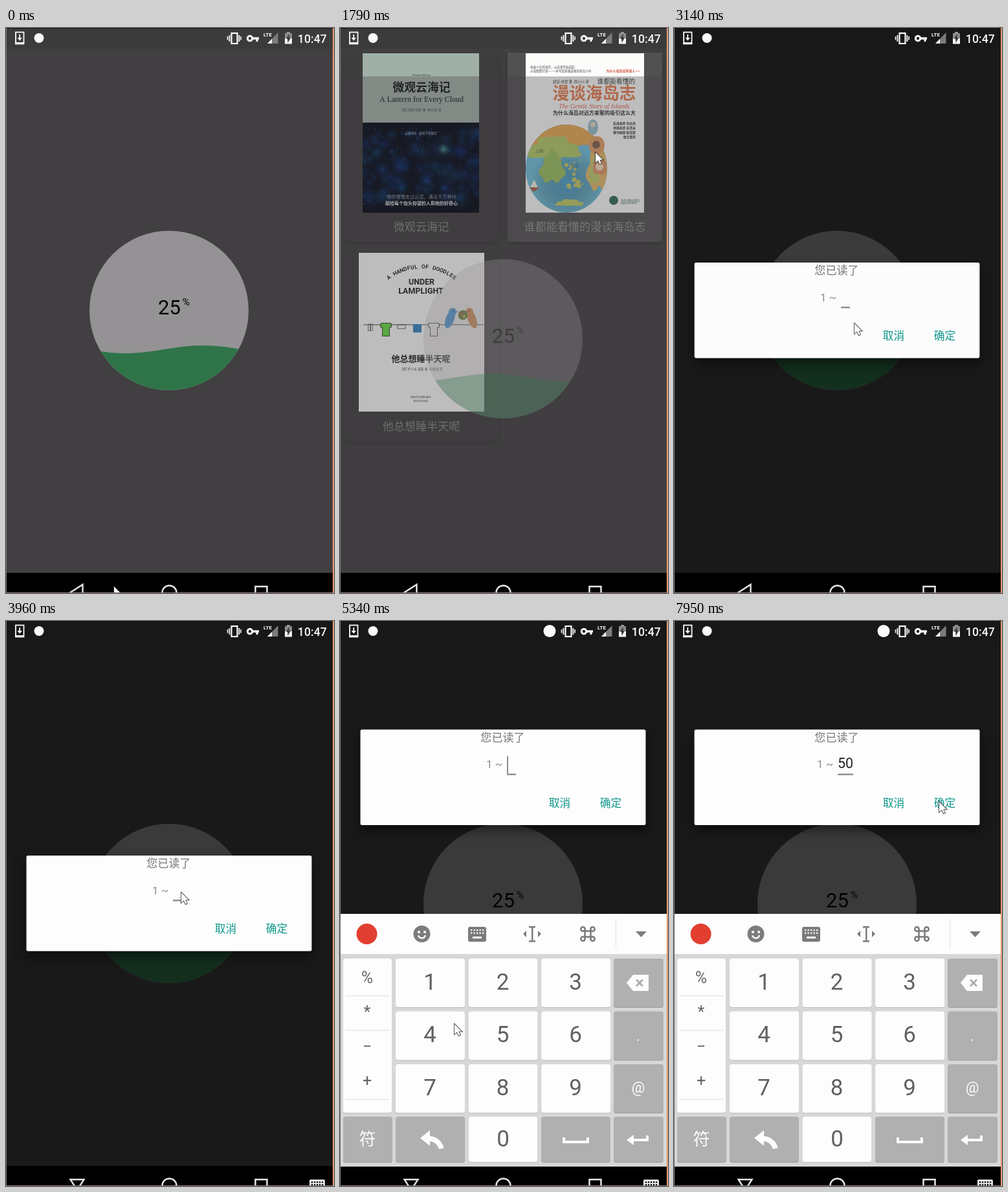
An HTML page with a canvas that plays this animation: 507 px wide and 872 px high, repeating every 8 s.

```html
<!DOCTYPE html>
<html lang="zh">
<head>
<meta charset="utf-8">
<title>Reading progress</title>
<style>
  html, body { margin: 0; width: 100%; height: 100%; overflow: hidden; background: #413f41; }
  canvas { display: block; }
</style>
</head>
<body>
<canvas id="stage" width="507" height="872"></canvas>
<script>
const W = 507, H = 872, LOOP = 8000, TAU = 2 * Math.PI;
const SANS = 'Roboto, "Noto Sans CJK SC", "Noto Sans CJK", sans-serif';
const SERIF = '"Liberation Serif", "Noto Sans CJK SC", "Noto Sans CJK", serif';
const ARIAL = '"Liberation Sans", "Noto Sans CJK SC", sans-serif';
const BG = '#413f41', GREY = '#7c7c7e', WHITE = '#fdfdfd', INK = '#222', KEYTEXT = '#606062';

// Moments when something is pressed or appears
const BACK = 400, OPEN_BOOK = 1590, ASK = 2940, FOCUS = 3960, SLIDE = 4000, BADGE = 4250;
const NUMERIC = 5080, FIVE = 6130, ZERO = 7200;

const main = document.getElementById('stage').getContext('2d');
let g = main;

const clamp = v => Math.max(0, Math.min(1, v));
const span = (t, a, b) => clamp((t - a) / (b - a));
const easeOut = p => 1 - (1 - p) ** 3;
const mix = (a, b, p) => a + (b - a) * p;
const times = (n, fn) => { for (let i = 0; i < n; i++) fn(i); };
const seeded = seed => () => (seed = (seed * 16807) % 2147483647) / 2147483647;

// y is the middle of the capital height
function text(s, x, y, size, color, { align = 'center', weight = 400, font = SANS, style = '' } = {}) {
  g.font = `${style} ${weight} ${size}px ${font}`;
  g.textAlign = align;
  g.fillStyle = color;
  g.fillText(s, x, y + size * 0.36);
}
function rect(x, y, w, h, color) { g.fillStyle = color; g.fillRect(x, y, w, h); }
function frameRect(x, y, w, h, color, width) {
  g.strokeStyle = color; g.lineWidth = width; g.strokeRect(x, y, w, h);
}
function round(x, y, w, h, r, color) {
  g.beginPath(); g.roundRect(x, y, w, h, r);
  g.fillStyle = color; g.fill();
}
function oval(x, y, rx, ry, color, turn = 0) {
  g.beginPath(); g.ellipse(x, y, rx, ry, turn, 0, TAU);
  g.fillStyle = color; g.fill();
}
const disc = (x, y, r, color) => oval(x, y, r, r, color);
function arc(x, y, r, color, width, from = 0, to = TAU) {
  g.beginPath(); g.arc(x, y, r, from, to);
  g.strokeStyle = color; g.lineWidth = width; g.stroke();
}
function line(points, color, width = 1, closed = false) {
  g.beginPath();
  points.forEach(p => g.lineTo(...p));
  if (closed) g.closePath();
  g.strokeStyle = color; g.lineWidth = width; g.stroke();
}
// Triangle from its tip to a base (dx, dy) away
function tri(x, y, dx, dy, half, color, outline) {
  const k = half / Math.hypot(dx, dy);
  g.beginPath();
  g.moveTo(x, y);
  g.lineTo(x + dx - dy * k, y + dy + dx * k);
  g.lineTo(x + dx + dy * k, y + dy - dx * k);
  g.closePath();
  if (outline) { g.strokeStyle = color; g.lineWidth = outline; g.stroke(); }
  else { g.fillStyle = color; g.fill(); }
}
function tray(x, y, w, h, color) {
  line([[x, y], [x, y + h], [x + w, y + h], [x + w, y]], color, 4);
}
function keyDots(x, y, step, color) {
  times(10, i => rect(x + i % 5 * step, y + (i / 5 | 0) * step, 2.2, 2.2, color));
}
function land(x, y, rx, ry, color, seed) {
  const rnd = seeded(seed), a = rnd() * TAU, b = rnd() * TAU;
  g.beginPath();
  for (let u = 0; u < TAU; u += 0.1) {
    const r = 1 + 0.16 * Math.sin(3 * u + a) + 0.1 * Math.sin(7 * u + b);
    g.lineTo(x + rx * r * Math.cos(u), y + ry * r * Math.sin(u));
  }
  g.fillStyle = color; g.fill();
}
function glow(x, y, r, color) {
  const f = g.createRadialGradient(x, y, 0, x, y, r);
  f.addColorStop(0, color); f.addColorStop(1, 'transparent');
  rect(x - r, y - r, 2 * r, 2 * r, f);
}
function within(path, draw) {
  g.save(); g.beginPath(); path(); g.clip();
  draw(); g.restore();
}

// ---- book list ----
function card(x, y, title) {
  g.save();
  g.shadowColor = 'rgba(0,0,0,.2)'; g.shadowBlur = 9; g.shadowOffsetY = 3;
  round(x, y, 239, 292, 10, '#3e3d3e');
  g.restore();
  text(title, x + 119.5, y + 269, 17.1, '#858787');
}
function cloudBook() {
  rect(35, 39, 180, 108, '#a0b0a7');
  text('Wenlan Harrow', 126, 72, 4.5, '#333', { font: SERIF });
  text('微观云海记', 126, 92, 17.8, '#161616', { font: SERIF, weight: 600 });
  text('A Lantern for Every Cloud', 126, 110, 12, '#161616', { font: SERIF });
  text('(英) 闻岚·哈罗 著  林小禾 译', 126, 126, 5, '#444');
  const rnd = seeded(41);
  within(() => g.rect(35, 146, 180, 139), () => {
    rect(35, 146, 180, 139, '#030814');
    times(90, () => glow(35 + rnd() * 180, 160 + rnd() * 105, 6 + rnd() * 18, `rgba(10,${45 + rnd() * 50 | 0},165,.34)`));
    times(260, () => rect(35 + rnd() * 180, 152 + rnd() * 125, 1.4, 1.4, `rgba(50,110,225,${rnd() * .7})`));
    glow(160, 187, 13, 'rgba(90,190,190,.75)');
  });
  text('云端书房 · 给孩子的夜空', 125, 162, 4.6, '#c8ced8');
  text('带你慢慢走过云层，遇见千万种光', 126, 260, 7.2, '#8f98a8');
  text('献给每个抬头仰望的人和他的好奇心', 126, 270, 7, '#e8e8e8', { weight: 700 });
}
function islandBook() {
  const left = { align: 'left' }, bold = { weight: 700 };
  rect(287, 39, 183, 246, '#fbfcfa');
  text('每座小岛的来历，从这里开始说起', 294, 60, 4.6, '#333', left);
  text('从海图到灯塔——一本写给普通读者的海岛小书', 294, 66, 4.6, '#333', left);
  text('为什么海岛这样迷人——', 464, 66, 5, '#d0392b', { align: 'right', weight: 700 });
  text('顾安·林登 著  周小川 译', 357, 83, 5.4, INK);
  text('谁都能看懂的', 427, 82, 9.8, INK, { weight: 500 });
  text('漫谈海岛志', 393, 101, 25.8, '#e0703f', { weight: 900 });
  text('The Gentle Story of Islands', 393, 120, 10, '#dc5034', { font: SERIF, style: 'italic' });
  text('为什么海岛对远方来客的吸引这么大', 393, 131, 8, '#181818', bold);
  ['航海老师 何远舟', '地理老师 苏青禾', '图书编辑 陆知夏', '联合推荐'].forEach((s, i) =>
    text(s, 457, 147 + i * 7, 4.8, INK, { align: 'right', weight: 700 }));
  within(() => g.ellipse(350, 217, 63, 68, 0, 0, TAU), () => {
    rect(287, 149, 126, 136, '#5fb9d8');
    glow(350, 240, 55, 'rgba(25,130,185,.6)');
    land(345, 165, 62, 20, '#e3a040', 5);
    land(330, 186, 40, 17, '#a9c455', 12);
    land(328, 216, 18, 24, '#8db64f', 30);
    land(400, 215, 17, 38, '#e0b055', 8);
    land(393, 222, 7, 20, '#b5c75c', 21);
    land(355, 270, 21, 5, '#b8c552', 3);
    const rnd = seeded(9);
    times(16, () => disc(350 + rnd() * 28, 202 + rnd() * 52, 1 + rnd() * 2.5, '#bfc353'));
    text('山谷', 309, 190, 6, '#49442b');
    text('海湾', 362, 213, 6, '#2a5f78');
    tri(300, 234, 0, 12, 6, '#f5efe0');
    tri(300, 253, 0, -7, 8, '#9b4f2e');
  });
  oval(391, 153, 8, 12, '#8fb8c6'); disc(391, 149, 4, '#e6d4b8');
  oval(397, 181, 12, 14, '#dc9150'); disc(396, 180, 6, '#714c39');
  round(391, 204, 21, 22, 6, '#d98b55'); disc(401, 214, 6, '#f2d9b0');
  disc(423, 266, 7, '#1c5c45');
  text('南屿读物出版社', 434, 266, 4.2, '#1c5c45', left);
  text('NANYU BOOKS', 434, 271, 3.7, '#1c5c45', left);
}
function shirt(x, color) {
  round(x - 9, 455, 18, 8, 3, '#444'); rect(x - 6, 457, 12, 19, '#444');
  round(x - 8, 456, 16, 6, 3, color); rect(x - 5, 458, 10, 17, color);
}
function bird(x, color, dir) {
  oval(x, 449, 6.5, 15, color, dir * .35);
  disc(x + 4 * dir, 438, 6, color);
  tri(x + 13 * dir, 438, -5 * dir, 0, 2, color);
  disc(x + 5 * dir, 437, .9, INK);
}
function comicBook() {
  rect(29, 347, 194, 245, '#fbfcfa');
  const title = 'A HANDFUL OF DOODLES', bold = { weight: 700 };
  [...title].forEach((c, i) => {
    g.save();
    g.translate(126, 453);
    g.rotate(mix(-.64, .64, i / (title.length - 1)));
    text(c, 0, -85, 8.5, INK, bold);
    g.restore();
  });
  text('UNDER', 126, 391, 12.5, INK, bold);
  text('LAMPLIGHT', 125, 405, 12.5, INK, bold);
  rect(36, 457.5, 186, 1, '#444');
  times(2, i => frameRect(43.5 + i * 4, 457, 3, 10, '#555', .8));
  frameRect(89, 458, 12, 6, '#555', .9);
  round(113, 457, 13, 13, 1, '#3584c2');
  shirt(71, '#62dc3e');
  shirt(145, '#fff');
  bird(170, '#3594dc', 1);
  bird(204, '#d98746', -1);
  disc(190, 443, 7.5, '#5b7b2c'); disc(188, 441, 2, '#d43b2f'); disc(192, 445, 2, '#e2c54c');
  text('他总想睡半天呢', 125, 510, 13, INK, bold);
  text('[美] 罗小米·温斯 著  何清溪 译', 127, 526, 4.8, '#555');
  text('南屿美术读物出版社', 125, 570, 3.5, '#333');
  text('青禾文化出品', 125, 576, 3.8, '#333');
}

const list = document.createElement('canvas');
list.width = W; list.height = H;
function paintList() {
  g = list.getContext('2d');
  rect(0, 0, W, H, BG);
  card(6, 38, '微观云海记');
  card(259, 38, '谁都能看懂的漫谈海岛志');
  card(6, 346, '他总想睡半天呢');
  cloudBook(); islandBook(); comicBook();
  g = main;
}

// ---- progress page ----
function progressPage(trough) {
  rect(0, 31, W, H, BG);
  disc(252, 436, 123, '#949294');
  within(() => g.arc(252, 436, 123, 0, TAU), () => {
    g.beginPath(); g.moveTo(120, 570);
    for (let x = 120; x <= 384; x += 3) g.lineTo(x, 496 + 6 * Math.cos((x - trough) / 238 * TAU));
    g.lineTo(384, 570);
    g.fillStyle = '#2f7449'; g.fill();
  });
  text('25', 252.5, 431, 31, '#000');
  text('%', 278.5, 422, 15.5, '#000');
}
function pages(t) {
  g.drawImage(list, 0, 0);
  const first = t < OPEN_BOOK;
  const shown = first ? 1 - span(t, BACK + 120, BACK + 390) : easeOut(span(t, OPEN_BOOK + 160, OPEN_BOOK + 490));
  if (!first && shown < 1) within(() => g.rect(259, 38, 239, 292), () =>
    disc(395, 192, 260 * easeOut(span(t, OPEN_BOOK, OPEN_BOOK + 360)), 'rgba(255,255,255,.1)'));
  if (shown > 0) {
    g.save();
    g.globalAlpha = shown;
    g.translate(0, 65 * (1 - shown));
    progressPage(first ? 185 + t * .12 : 212 + (t - 2590) * .12);
    g.restore();
  }
  rect(0, 0, W, 32, '#3c3b3c');
}

// ---- dialog ----
// Caret blinks once a second, starting anew with each typed digit
const caretOn = t => t > SLIDE && (t - (t >= ZERO ? ZERO : t >= FIVE ? FIVE : 3920)) % 1000 < 500;

function dialog(t) {
  const p = easeOut(span(t, ASK, ASK + 240));
  if (!p) return;
  rect(0, 0, W, H, `rgba(0,0,0,${.6 * p})`);
  const lift = t > SLIDE ? 1 - Math.exp((SLIDE - t) / 32) : 0;
  const y = mix(362, 167.5, lift), s = mix(.9, 1, p);
  const typed = t >= ZERO ? '50' : t >= FIVE ? '5' : '';
  const width = Math.max(14, typed.length * 12), left = 265 - width / 2;
  g.save();
  g.globalAlpha = p;
  g.translate(252, y + 74); g.scale(s, s); g.translate(-252, -y - 74);
  g.save();
  g.shadowColor = 'rgba(0,0,0,.5)'; g.shadowBlur = 18; g.shadowOffsetY = 8;
  round(31.5, y, 441, 147.5, 2.5, WHITE);
  g.restore();
  text('您已读了', 251.5, y + 12, 17.1, '#757575');
  text('1 ~', left - 32, y + 53.5, 17, '#8c8c8c', { align: 'left' });
  text(typed, left, y + 52, 21.4, INK, { align: 'left' });
  rect(left, y + 68, width, 2.5, '#929292');
  if (caretOn(t)) rect(left + typed.length * 12, y + 41, 2, 27, '#8c8c8c');
  text('取消', 339.5, y + 113, 16.8, '#0d968a', { weight: 500 });
  text('确定', 418.5, y + 113, 16.8, '#0d968a', { weight: 500 });
  g.restore();
}

// ---- keyboard ----
const colX = i => 86 + 112.6 * i, rowY = j => 521 + 81.5 * j;

function key(x, y, w, h, dark, pressed) {
  round(x, y + 1, w, h, 4, dark ? '#9d9d9f' : '#bdbdbf');
  round(x, y, w, h, 4, pressed ? (dark ? '#929294' : '#cfcfd1') : dark ? '#b0b0b1' : WHITE);
}
function toolbar() {
  rect(1, 452, 504, 62, WHITE);
  disc(41.5, 483, 16, '#e23f30');
  disc(126.5, 483, 13, GREY);
  disc(122, 480, 2, '#fff'); disc(131, 480, 2, '#fff');
  arc(126.5, 484, 5.5, '#fff', 2.5, .2, 2.9);
  round(198, 472, 28, 23, 3, GREY);
  keyDots(202, 476, 4.5, '#fff');
  rect(205, 487, 14, 3, '#fff');
  rect(296, 472, 2.5, 22, GREY);
  times(2, i => rect(292, 471 + i * 22, 10, 2.5, GREY));
  for (const d of [-1, 1]) {
    tri(297 + 14 * d, 483, -5 * d, 0, 5, GREY);
    for (const e of [-1, 1]) arc(383 + d * 7.5, 483 + e * 7.5, 3.2, GREY, 2.6);
  }
  frameRect(378.5, 478.5, 9, 9, GREY, 2.6);
  rect(426, 460, 1, 45, '#e2e2e2');
  tri(465.5, 488, 0, -9, 8.5, GREY);
}
function sideKeys(numeric) {
  key(5, 521, 75, 238, false);
  for (const i of [0, 1, 3]) rect(8, 578 + 53.3 * i, 69, 1, '#dedede');
  [...(numeric ? '%*−+' : '，。?!')].forEach((c, i) => {
    const wide = !numeric && i < 2 ? 7 : 0; // full-width marks sit low and left
    text(c, 42 + wide, 550 + 53 * i - wide, 25, '#666');
  });
  times(3, j => key(423, rowY(j), 77, 75, true));
  tri(443, 558.5, 10, 0, 12.5, WHITE);
  rect(453, 546, 24, 25, WHITE);
  for (const d of [-5, 5]) line([[463 - d, 553.5], [463 + d, 563.5]], '#aaa', 2.6);
  text(numeric ? '.' : '重输', 461, 640, 22, WHITE);
  text(numeric ? '@' : '0', 461, 720, numeric ? 23 : 27, WHITE);
}
function gridKeys(t, numeric) {
  const letters = ['', 'ABC', 'DEF', 'GHI', 'JKL', 'MNO', 'PQRS', 'TUV', 'WXYZ'], arial = { font: ARIAL };
  letters.forEach((s, i) => {
    const x = colX(i % 3), y = rowY(i / 3 | 0), mid = x + 53;
    key(x, y, 107, 75, false, i === 4 && Math.abs(t - FIVE) < 70);
    if (numeric) text(i + 1, mid, y + 35, 35, KEYTEXT);
    else {
      if (s) text(i + 1, mid, y + 14, 18, '#a2a2a4', arial);
      text(s || '1', mid, y + 38, 25.5, KEYTEXT, arial);
    }
  });
}
function bottomKeys(t, numeric) {
  key(5, 765, 76, 70, true);
  text('符', 42.5, 800, 26, WHITE);
  key(423, 765, 77, 70, true);
  line([[475, 794], [475, 801], [452, 801]], WHITE, 4);
  tri(443, 801, 11, 0, 8, WHITE);
  if (numeric) {
    key(86, 765, 107, 70, true);
    tri(124, 798, 15, 0, 12, WHITE);
    arc(138, 818, 19, WHITE, 8, -Math.PI / 2, -.2);
    key(199, 765, 106, 70, false, Math.abs(t - ZERO) < 70);
    text('0', 252, 798, 35, KEYTEXT);
    key(311, 765, 107, 70, true);
    tray(346, 797, 37, 7, WHITE);
  } else {
    key(86, 765, 90, 70, true, t > NUMERIC - 100);
    text('123', 131, 800, 25, WHITE);
    key(183, 765, 139, 70, false);
    round(248, 782, 8, 14, 4, GREY);
    arc(252, 790, 7.5, GREY, 2, 0, Math.PI);
    rect(251, 797, 2, 5, GREY);
    tray(234, 809, 37, 9, GREY);
    key(327, 765, 91, 70, true);
    text('中', 359, 800, 25, WHITE); text('/英', 384, 803, 18, WHITE);
  }
}
function keyboard(t) {
  if (t < SLIDE) return;
  const numeric = t >= NUMERIC;
  g.save();
  g.globalAlpha = 1 - Math.exp((SLIDE - t) / 40);
  g.translate(0, 40 * Math.exp((SLIDE - t) / 32));
  rect(1, 513, 504, 329, '#d7d7d9');
  toolbar();
  sideKeys(numeric);
  gridKeys(t, numeric);
  bottomKeys(t, numeric);
  g.restore();
}

// ---- system bars ----
function statusIcons(t) {
  const c = '#fafafa';
  frameRect(15, 6.5, 12.5, 18, c, 1.8);
  rect(14, 22, 14, 3, c);
  rect(20.3, 10, 1.8, 6, c); tri(21.2, 19.5, 0, -4.5, 3.7, c);
  disc(51, 15.5, 7.5, c);
  if (t > BADGE) disc(324, 15.5, 9.5, c);
  frameRect(348.5, 8, 9, 16, c, 2.2);
  for (const d of [-1, 1]) {
    rect(352 + d * 7.5, 11, 1.8, 10, c);
    rect(352 + d * 10.3, 13, 1.6, 5.5, c);
  }
  arc(377, 16, 3.7, c, 3);
  rect(380, 14.3, 11, 3.5, c); rect(386.5, 16, 3, 5, c);
  within(() => { g.moveTo(420.5, 7); g.lineTo(420.5, 24); g.lineTo(404, 24); }, () => {
    rect(404, 7, 17, 17, '#7c7c7c'); rect(404, 7, 7, 17, c);
  });
  text('LTE', 404.5, 10.5, 8, c, { weight: 700 });
  rect(434, 6, 5, 3, '#9a9a9a'); rect(431, 8, 11, 8, '#8b8b8b'); rect(431, 16, 11, 8.5, c);
  tri(437.5, 9, -2, 8, 2.5, '#3a3a3a'); tri(435.5, 23, 2, -8, 2.5, '#3a3a3a');
  text('10:47', 473.3, 16.3, 17.7, c, { weight: 500 });
}
function navBar(t) {
  const c = '#e6e6e6', press = span(t, BACK, BACK + 100) * (1 - span(t, BACK + 150, BACK + 600));
  rect(0, 841, W, 31, '#000');
  if (press) within(() => g.rect(0, 841, W, 31), () => disc(110, 874, 47, `rgba(255,255,255,${.2 * press})`));
  if (t >= FOCUS) {
    tri(110, 878, 0, -16, 10.5, c, 2.4);
    round(469, 862, 24, 14, 2, c);
    keyDots(472, 865, 4, '#000');
  } else tri(95, 874, 23.5, 0, 15, c, 2.4);
  arc(252.5, 871.5, 11, c, 2.5);
  frameRect(385.5, 862, 18, 18, c, 2.5);
}

// ---- pointer: places it comes to rest, with the time of arrival ----
const STOPS = [
  [0, 167, 862], [300, 112, 862], [1080, 408, 288], [1370, 395, 192], [2500, 279, 456],
  [3710, 271, 419], [4110, 273, 427], [4950, 130, 795], [5340, 177, 622], [5460, 160, 572],
  [6040, 250, 640], [6890, 250, 786], [7860, 400, 273], [7950, 410, 279]
];
function pointer(t) {
  const next = STOPS.findIndex(s => s[0] > t), i = next < 0 ? STOPS.length - 1 : next;
  const [start, x0, y0] = STOPS[i - 1], [end, x1, y1] = STOPS[i];
  const travel = Math.min(end - start, 130 + Math.hypot(x1 - x0, y1 - y0) / 4);
  const p = span(t, end - travel, end), e = p * p * (3 - 2 * p);
  g.save();
  g.translate(mix(x0, x1, e), mix(y0, y1, e));
  g.fillStyle = '#fff';
  line([[0, 0], [0, 16], [3.8, 12.5], [6.5, 18], [9, 17], [6.5, 11.5], [11.5, 11.5]], '#111', 1.4, true);
  g.fill();
  g.restore();
}
function edges() {
  rect(0, 0, W, 1, '#111');
  rect(0, 0, 1, H, '#77777a');
  rect(0, 871, W, 1, '#8f777a');
  rect(505, 0, 2, H, '#e39a6c');
}

function frame(now) {
  const t = now % LOOP;
  pages(t);
  dialog(t);
  navBar(t);
  keyboard(t);
  statusIcons(t);
  pointer(t);
  edges();
  requestAnimationFrame(frame);
}
paintList();
requestAnimationFrame(frame);
</script>
</body>
</html>
```
